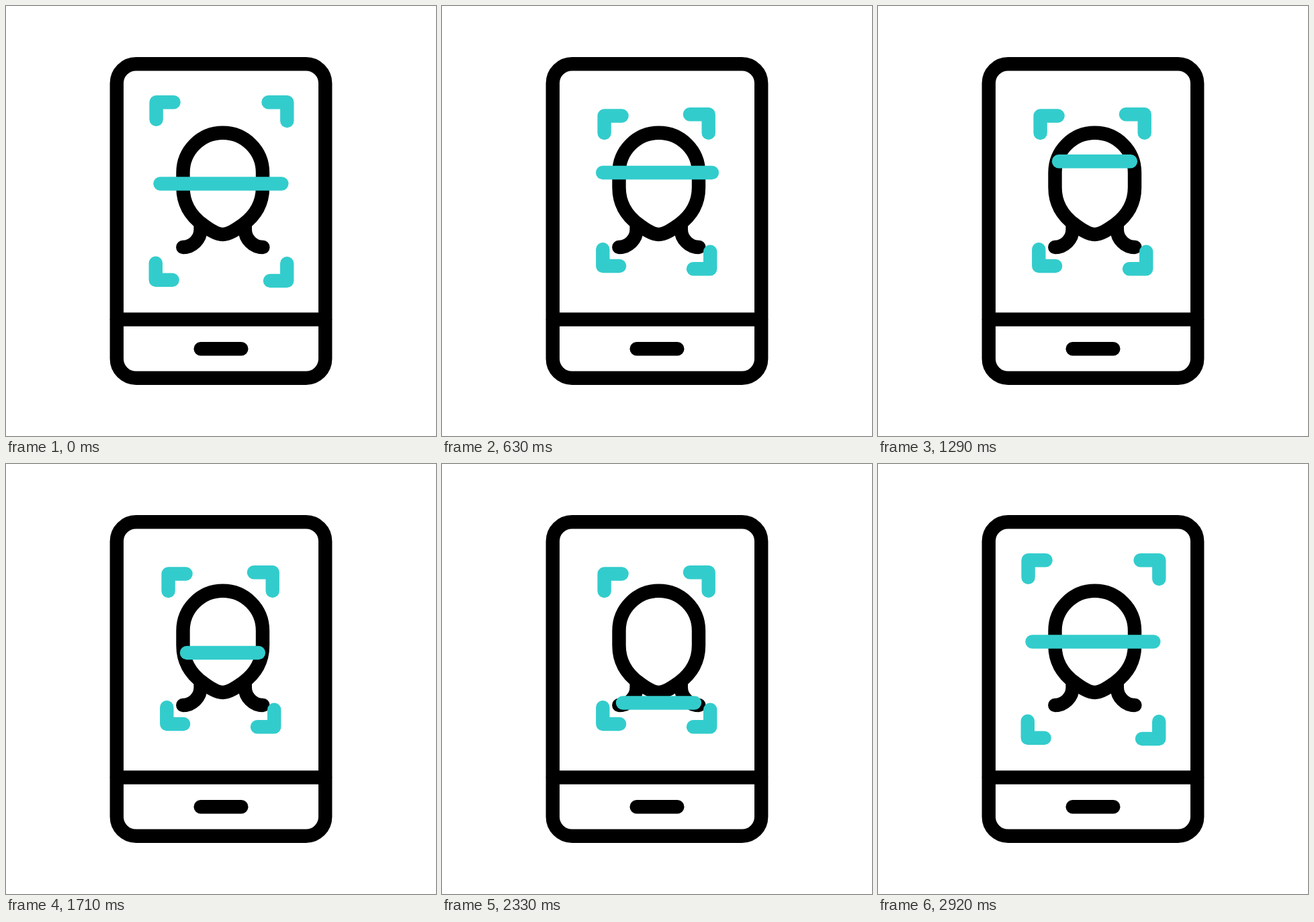
Write an HTML page with a canvas that moves like this. It is 640 by 640 pixels and loops after 3000 ms.

```html
<!DOCTYPE html>
<html lang="en">
<head>
<meta charset="utf-8">
<title>Face scan</title>
<style>
  html, body { margin: 0; width: 100%; height: 100%; overflow: hidden; background: #fff; }
  canvas { display: block; width: 640px; height: 640px; }
</style>
</head>
<body>
<canvas id="stage" width="640" height="640"></canvas>
<script>
const ctx = document.getElementById("stage").getContext("2d");
const LOOP = 3000;
const BLACK = "#000";
const TEAL = "#33cccc";

const face = new Path2D(
  "M263.5 248 A59.25 59.25 0 0 1 382 248 V270 " +
  "C382 298 367 315 352.5 325.5 C342 333 332 340 322.5 340 " +
  "C313 340 303 333 293 325.5 C278.5 315 263.5 298 263.5 270 Z");
const neck = new Path2D(
  "M289.6 325 V332.5 C289.6 347 277.5 359 263.3 359 " +
  "M355.8 325 V332.5 C355.8 347 368 359 382.4 359");

// Each bracket: corner point, arm lengths, and travel towards the face.
const brackets = [
  { x: 223.6, y: 143.3, w: 26, h: 25.5, dx: 18, dy: 20.2 },
  { x: 418.3, y: 143.3, w: -27.8, h: 27.7, dx: -21.6, dy: 17.9 },
  { x: 222.8, y: 407.7, w: 24.8, h: -24.9, dx: 16.5, dy: -20.7 },
  { x: 418.2, y: 409, w: -25.2, h: -25.7, dx: -19, dy: -17.7 }
];

// Scan bar poses: left end, right end, height.
const wide = [229.5, 410.3, 264.5];
const top_ = [269, 375.9, 196.5];
const low = [269, 375.9, 355.5];

const progress = (t, from, to) => Math.min(1, Math.max(0, (t - from) / (to - from)));
const mix = (a, b, p) => a.map((v, i) => v + (b[i] - v) * p);
const easeOut = p => 1 - Math.pow(1 - p, 1.53);

function line(...pts) {
  ctx.beginPath();
  for (let i = 0; i < pts.length; i += 2) ctx.lineTo(pts[i], pts[i + 1]);
  ctx.stroke();
}

function drawPhone() {
  ctx.strokeStyle = BLACK;
  ctx.beginPath();
  ctx.roundRect(164.8, 86.2, 310.4, 467.6, 28.8);
  ctx.stroke();
  line(165, 466.5, 475, 466.5);
  line(289.7, 510.2, 350.3, 510.2);
}

function drawFace() {
  ctx.strokeStyle = BLACK;
  ctx.stroke(face);
  ctx.stroke(neck);
}

function drawBrackets(step) {
  const p = progress(step, 1, 13) - progress(step, 61, 69);
  for (const b of brackets) {
    const x = b.x + b.dx * p, y = b.y + b.dy * p;
    line(x + b.w, y, x, y, x, y + b.h);
  }
}

function barPose(step) {
  if (step < 24) return mix(wide, top_, easeOut(progress(step, 14, 20)));
  if (step < 61) return mix(top_, low, progress(step, 24, 56));
  return mix(low, wide, progress(step, 61, 70));
}

function draw(ms) {
  // 24 steps per second, on a 10 ms clock
  const step = Math.floor((Math.floor(ms / 10) + 0.49) * 0.24);
  ctx.fillStyle = "#fff";
  ctx.fillRect(0, 0, 640, 640);
  ctx.lineWidth = 20.4;
  ctx.lineCap = ctx.lineJoin = "round";
  drawPhone();
  drawFace();
  ctx.strokeStyle = TEAL;
  drawBrackets(step);
  const [left, right, y] = barPose(step);
  line(left, y, right, y);
}

function tick() {
  draw(performance.now() % LOOP);
  requestAnimationFrame(tick);
}
tick();
</script>
</body>
</html>
```
